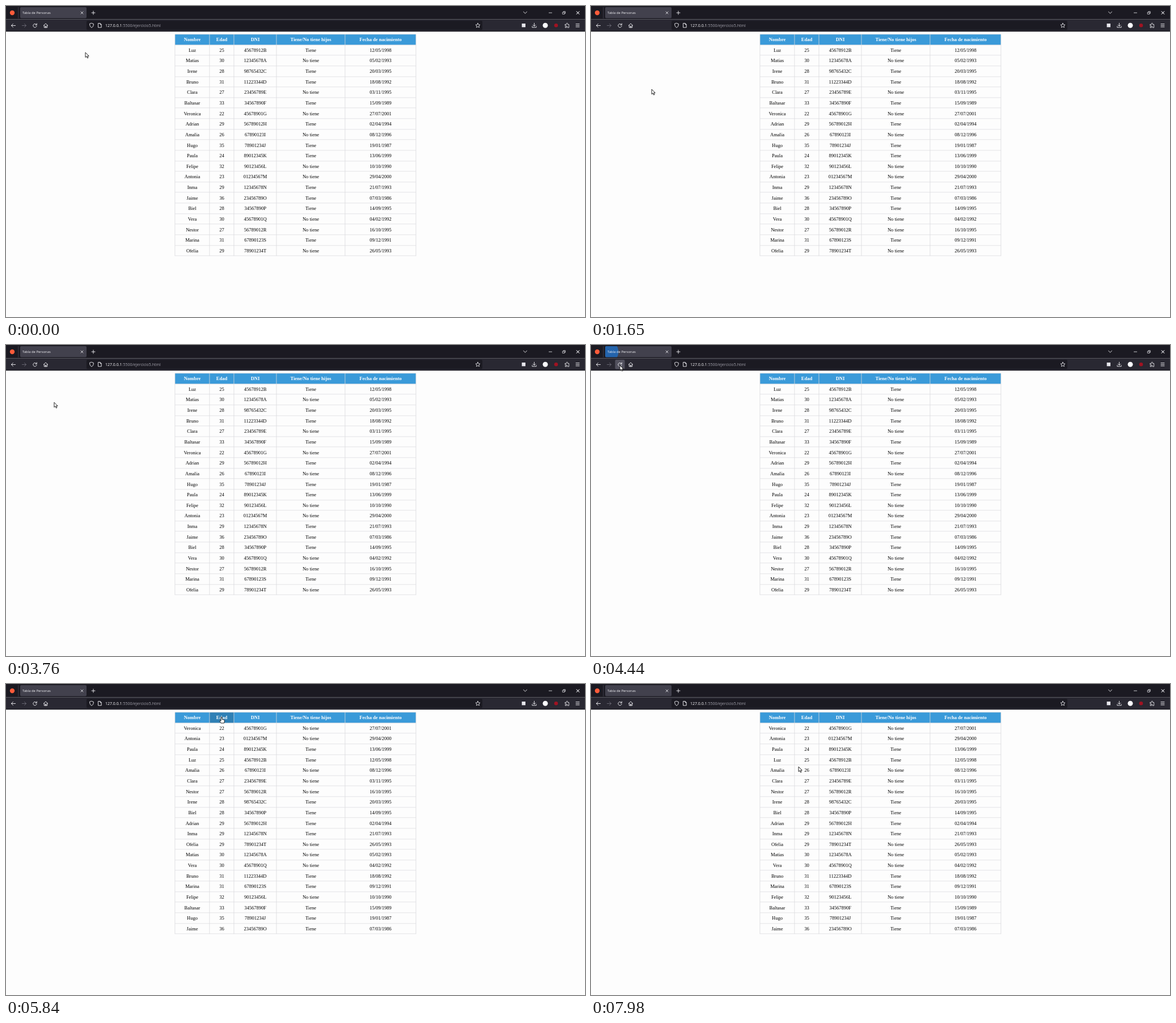
An HTML page with a canvas that plays this animation: 1021 px wide and 549 px high, repeating every 8000 ms.

```html
<!DOCTYPE html>
<html lang="es">
<head>
<meta charset="utf-8">
<title>Tabla de Personas</title>
<style>
html, body { margin: 0; width: 100%; height: 100%; overflow: hidden; background: #fdfdfd; }
canvas { display: block; }
</style>
</head>
<body>
<canvas id="stage" width="1021" height="549"></canvas>
<script>
const ctx = document.getElementById('stage').getContext('2d');
const LOOP = 8000, SORT_AT = 5500, RELOAD_AT = 4405, BURST = 375;
const UI = '"Open Sans", "Noto Sans", sans-serif';
const SERIF = '"Liberation Serif", "Times New Roman", serif';
const LIGHT = '#f4f4f8';

const heads = ['Nombre', 'Edad', 'DNI', 'Tiene/No tiene hijos', 'Fecha de nacimiento'];
const edges = [298, 359, 402, 477, 598, 723];
const TOP = 50, ROW = 18.63;

const people = `Luz 25 45678912B + 12/05/1998
Matias 30 12345678A - 05/02/1993
Irene 28 98765432C + 20/03/1995
Bruno 31 11223344D + 18/08/1992
Clara 27 23456789E - 03/11/1995
Baltasar 33 34567890F + 15/09/1989
Veronica 22 45678901G - 27/07/2001
Adrian 29 56789012H + 02/04/1994
Amalia 26 67890123I - 08/12/1996
Hugo 35 78901234J + 19/01/1987
Paula 24 89012345K + 13/06/1999
Felipe 32 90123456L - 10/10/1990
Antonia 23 01234567M - 29/04/2000
Inma 29 12345678N + 21/07/1993
Jaime 36 23456789O + 07/03/1986
Biel 28 34567890P + 14/09/1995
Vera 30 45678901Q - 04/02/1992
Nestor 27 56789012R - 16/10/1995
Marina 31 67890123S + 09/12/1991
Ofelia 29 78901234T - 26/05/1993`.split('\n').map(line => {
  const cells = line.split(' ');
  cells[3] = cells[3] === '+' ? 'Tiene' : 'No tiene';
  return cells;
});
const byAge = [...people].sort((a, b) => a[1] - b[1]);

// pointer path: time, x, y
const path = [
  [0, 140, 82], [250, 139, 78], [460, 138, 88], [650, 138, 88],
  [1000, 113, 138], [1270, 113, 138], [1650, 107, 147], [2060, 107, 148],
  [2680, 107, 142], [3000, 107, 142], [3500, 103, 136], [4150, 52, 38],
  [4440, 51, 36], [4560, 51, 36], [5250, 380, 58], [6300, 380, 58],
  [6900, 366, 105], [7090, 366, 110], [7730, 373, 158], [7850, 363, 152],
  [7980, 366, 146], [8000, 366, 146]
];

function pointerAt(t) {
  const i = Math.max(1, path.findIndex(p => p[0] > t));
  const [t0, x0, y0] = path[i - 1], [t1, x1, y1] = path[i];
  const u = (t - t0) / (t1 - t0), k = u * u * (3 - 2 * u);
  return [x0 + (x1 - x0) * k, y0 + (y1 - y0) * k];
}

function box(x, y, w, h, color, r = 0) {
  ctx.fillStyle = color;
  ctx.beginPath();
  ctx.roundRect(x, y, w, h, r);
  ctx.fill();
}

function disc(x, y, r, color) {
  ctx.fillStyle = color;
  ctx.beginPath();
  ctx.arc(x, y, r, 0, Math.PI * 2);
  ctx.fill();
}

function text(str, x, y, font, color, align = 'left') {
  ctx.font = font;
  ctx.fillStyle = color;
  ctx.textAlign = align;
  ctx.fillText(str, x, y);
}

// strokes an SVG path around the point (x, y)
function icon(x, y, d, color = LIGHT, width = 0.9) {
  ctx.save();
  ctx.translate(x, y);
  ctx.strokeStyle = color;
  ctx.lineWidth = width;
  ctx.lineCap = ctx.lineJoin = 'round';
  ctx.stroke(new Path2D(d));
  ctx.restore();
}

function drawTabs(t) {
  box(0, 0, 1021, 23.5, '#1b1a22');
  disc(11, 12, 4.2, '#ff5b3a');
  box(21.5, 2, 0.7, 20, '#4a4956');
  box(25, 2, 117, 19.5, '#42414d', 2);

  const u = (t - RELOAD_AT) / BURST;
  if (u > 0 && u < 1) {
    const k = 1 - (1 - u) ** 2;
    ctx.save();
    ctx.beginPath();
    ctx.roundRect(25, 2, 117, 19.5, 2);
    ctx.clip();
    ctx.globalAlpha = 0.55 * (1 - k * k);
    disc(29, 12, 3 + 90 * k, '#0a84ff');
    ctx.restore();
  }

  text('Tabla de Personas', 29, 14.2, '5.9px ' + UI, LIGHT);
  const cross = 'M-2-2L2 2M2-2L-2 2';
  icon(134, 12, cross, LIGHT, 0.8);
  icon(154, 12, 'M-3 0H3M0-3V3');
  icon(915.5, 11.5, 'M-3-1.3L0 1.6L3-1.3');
  icon(960, 12, 'M-2.5 0H2.5', LIGHT, 0.8);
  icon(984, 12, 'M-2.3-1H1V2.3H-2.3ZM-1-1V-2.3H2.3V1H1', LIGHT, 0.7);
  icon(1008.5, 12, cross + 'M-2.5-2.5L2.5 2.5M2.5-2.5L-2.5 2.5', LIGHT, 0.8);
}

function drawToolbar(overReload) {
  box(0, 23.5, 1021, 21.5, '#292832');
  box(0, 44.4, 1021, 0.8, '#0e0d13');
  box(142, 26, 698, 16.5, '#1b1a22', 2);
  if (overReload) box(42.5, 26, 17, 16.5, '#52515e', 2);

  icon(13, 34.5, 'M3.6 0H-3.6M-.6-3L-3.6 0L-.6 3');
  icon(32, 34.5, 'M-3.6 0H3.6M.6-3L3.6 0L.6 3', '#6c6b76');
  icon(51, 34.5, 'M2.6-1.8A3.2 3.2 0 1 0 3.2.8M3.3-3.6V-1.1H.8');
  icon(70, 34.5, 'M-3.7 0L0-3.6L3.7 0M-2.7-.8V3.5H2.7V-.8M-.7 3.3V1H.7V3.3');
  icon(151, 34.2, 'M0-3.8L3.4-2.6C3.4 1 2.2 2.8 0 4C-2.2 2.8-3.4 1-3.4-2.6Z');
  icon(165.5, 34.2, 'M-2.6-3.7H.6L2.7-1.6V3.7H-2.6ZM.5-3.5V-1.4H2.5');

  const font = '7px ' + UI, host = '127.0.0.1';
  text(host, 175, 37, font, '#fbfbfe');
  text(':5500/ejercicio5.html', 175 + ctx.measureText(host).width, 37, font, '#a3a2ac');

  icon(832, 34.3, 'M0-4L1.2-1.4L4-1.1L1.9.8L2.5 3.6L0 2.2L-2.5 3.6L-1.9.8L-4-1.1L-1.2-1.4Z', LIGHT, 0.8);
  box(909.6, 31, 6.4, 6.4, '#e6e6ec');
  icon(931.5, 34.2, 'M0-4V1.5M-2.4-.8L0 1.6L2.4-.8M-3.6 1.7V3.6H3.6V1.7');
  disc(951, 34.3, 4.5, '#fbfbfe');
  disc(970, 34.3, 3.3, '#a01322');
  icon(989.5, 34.3, 'M-3.3-1.8H-1.2V-3A1.1 1.1 0 0 1 1-3V-1.8H3.2V3.8H.8V2.7A1 1 0 0 0-1.2 2.7V3.8H-3.3V1.9H-2.4A1 1 0 0 0-2.4 0H-3.3Z', LIGHT, 0.8);
  icon(1008, 34.3, 'M-3-2.6H3M-3 0H3M-3 2.6H3');
}

function drawTable(rows, hover) {
  const left = edges[0], width = edges[5] - left, height = ROW * 21;
  box(left, TOP, width, ROW, '#3a9ad9');
  if (hover >= 0) box(edges[hover], TOP, edges[hover + 1] - edges[hover], ROW, '#2f80b5');

  for (let i = 0; i <= 21; i++) box(left, Math.round(TOP + i * ROW) - 0.5, width, 0.8, '#dadade');
  for (const x of edges) box(x - 0.5, TOP, 0.8, height, '#dadade');

  [heads, ...rows].forEach((cells, r) => cells.forEach((cell, c) => {
    const x = (edges[c] + edges[c + 1]) / 2;
    const y = TOP + (r + 0.5) * ROW + 2.9;
    text(cell, x, y, (r ? '' : 'bold ') + '8.5px ' + SERIF, r ? '#000' : '#fff', 'center');
  }));
}

const ARROW = new Path2D('M0 0V8.7L2-.1V6.8L2 6.8L3.5 10L5-.4L5 9.4L3.6 6.3H6.2Z'.replace(/L2-.1V6.8|L5-.4/g, ''));
const HAND = new Path2D('M-1 .6Q0-.6 1 .6V4.4L4.4 5.2Q5.6 5.6 5.4 7L4.6 11H-.9L-3.4 7.4Q-3.4 6-1 7.2Z');

function drawPointer(x, y, isHand) {
  const shape = isHand ? HAND : ARROW;
  ctx.save();
  ctx.translate(x, y);
  ctx.lineJoin = 'round';
  ctx.lineWidth = 0.9;
  ctx.fillStyle = '#fff';
  ctx.strokeStyle = '#111';
  ctx.fill(shape);
  ctx.stroke(shape);
  ctx.restore();
}

function draw(t) {
  const [x, y] = pointerAt(t);
  const inHead = y >= TOP && y < TOP + ROW;
  const hover = inHead ? heads.findIndex((_, i) => x >= edges[i] && x < edges[i + 1]) : -1;
  const overReload = x > 42 && x < 60 && y > 25 && y < 43;

  box(0, 0, 1021, 549, '#fdfdfd');
  drawTabs(t);
  drawToolbar(overReload);
  drawTable(t < SORT_AT ? people : byAge, hover);
  drawPointer(x, y, hover >= 0);
}

const start = performance.now();
function tick() {
  draw((performance.now() - start) % LOOP);
  requestAnimationFrame(tick);
}
tick();
</script>
</body>
</html>
```
